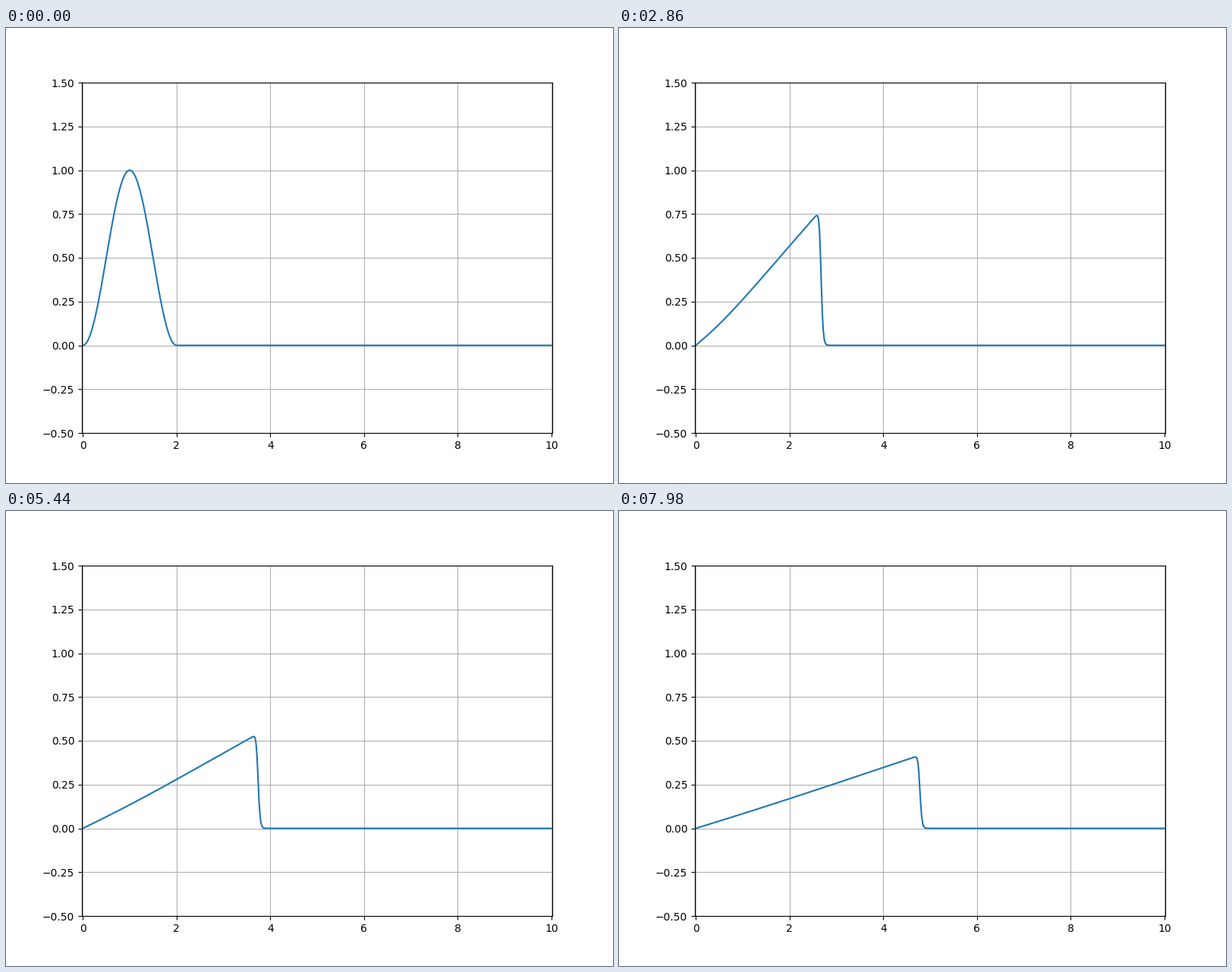
Animation of 800 by 600 pixels, one loop 8000 ms. Source, as a matplotlib script:

```python
import numpy as np
import matplotlib.pyplot as plt
from matplotlib.animation import FuncAnimation

FRAMES = 400
INTERVAL = 20
DX = 0.02
CFL = 0.8

x = np.arange(501) * DX


def flux(u):
    return 0.5 * u ** 2


def step(u):
    """Advance Burgers' equation by one Lax-Friedrichs step."""
    dt = CFL * DX / np.abs(u).max()
    f = flux(u)
    new = np.zeros_like(u)
    new[1:-1] = 0.5 * (u[2:] + u[:-2]) - dt / (2 * DX) * (f[2:] - f[:-2])
    return new


def solve():
    u = np.where(x <= 2, 0.5 * (1 - np.cos(np.pi * x)), 0.0)
    states = [u]
    for _ in range(FRAMES - 1):
        states.append(step(states[-1]))
    return states


states = solve()

fig, ax = plt.subplots(figsize=(8, 6), dpi=100)
ax.set_xlim(-DX, 10 + DX)
ax.set_ylim(-0.5, 1.5)
ax.grid(True)
line, = ax.plot(x, states[0])


def update(i):
    line.set_ydata(states[i])
    return line,


anim = FuncAnimation(fig, update, frames=FRAMES, interval=INTERVAL,
                     repeat=True, repeat_delay=0)
plt.show()
```
